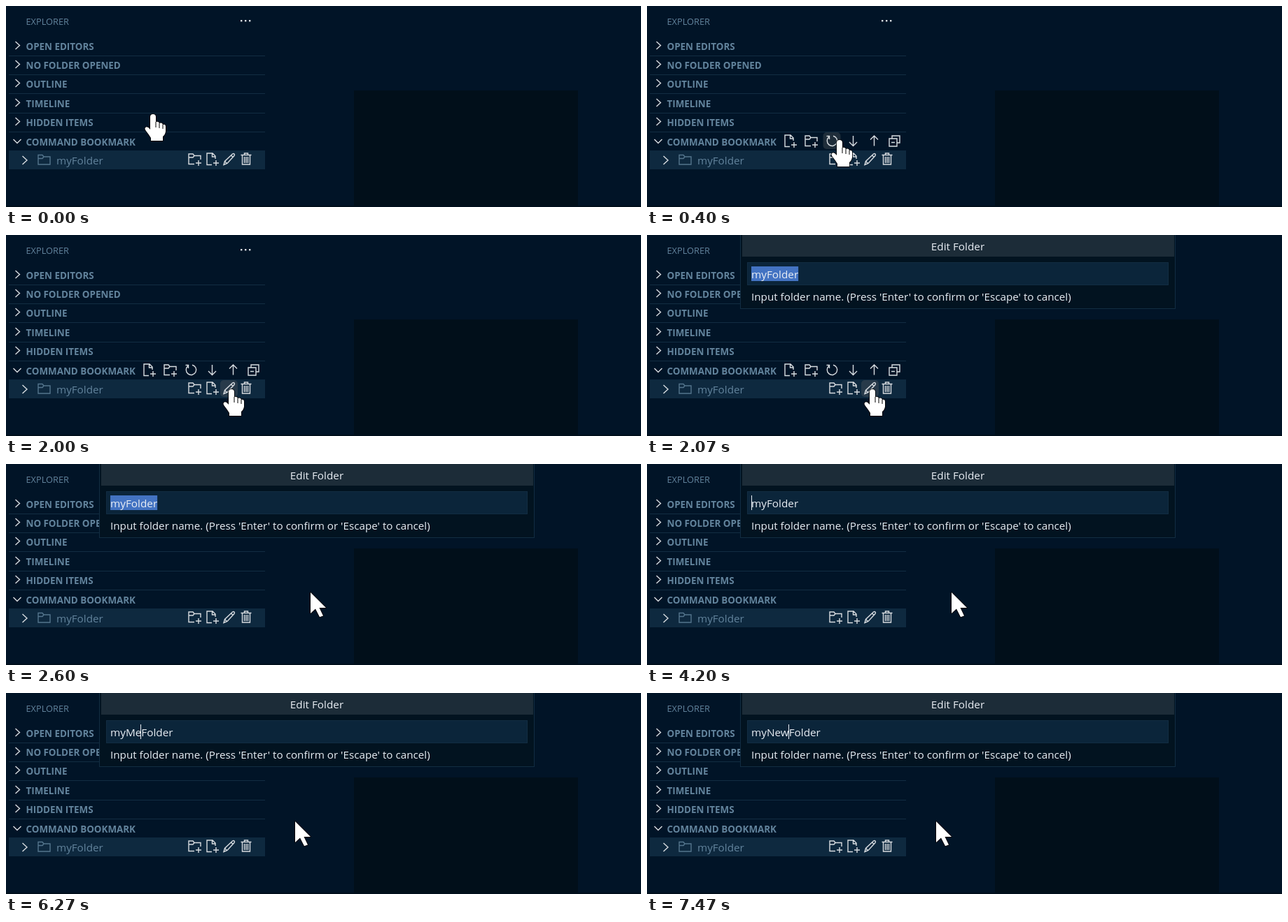
Write an HTML page with a canvas that moves like this. It is 907 px wide and 288 px high and loops after 8 s.

```html
<!DOCTYPE html>
<html lang="en">
<head>
<meta charset="utf-8">
<title>Edit Folder</title>
<style>
html, body { margin: 0; width: 100%; height: 100%; overflow: hidden; background: #011427; }
canvas { display: block; }
</style>
</head>
<body>
<canvas id="stage" width="907" height="288"></canvas>
<script>
const ctx = document.getElementById('stage').getContext('2d');
const LOOP = 8000, STEP = 200 / 3;
const FAMILY = '"Open Sans", "Noto Sans", sans-serif';
const BODY = '15.3px ' + FAMILY;
const HEAD = 'bold 13.4px ' + FAMILY;
const BACK = '#011427', LINE = '#122d42', MUTED = '#62839c', LIGHT = '#d8dce0', TEXT = '#e9eef4';

const sections = ['OPEN EDITORS', 'NO FOLDER OPENED', 'OUTLINE', 'TIMELINE', 'HIDDEN ITEMS', 'COMMAND BOOKMARK'];

const newFolder = 'M9 16.5H1V2h6l2 2.5h9V10M1 7h6l2-2.5M15 11v8M11 15h8';
const newFile = 'M8 17.5H1V1h8l4 4v4M8.5 1v5H13M14 11v8M10 15h8';
const folder = 'M1 14.5V1h6l2 2.5h9v11zM1 6h6l2-2.5';
const pencil = 'M1 17.5l1.5-5L13.5 2q1.5-1 2.5 0t0 2.5L6 15.5zM11.5 4l3 3M2.5 12.5l3 3';
const trash = 'M.5 3.5h15M5.5 3V1h5v2M2.5 4v13h11V4M5.5 6v9M8 6v9M10.5 6v9';

// Each icon: path, left, top, hover centre x
const rowIcons = [[newFolder, 260, 210, 269], [newFile, 286, 210, 294], [pencil, 310, 210, 318.5], [trash, 335, 210, 343]];
const barIcons = [
  [newFile, 196, 184, 205],
  [newFolder, 225, 184, 235],
  ['M4 2.6A7.2 7.2 0 1 0 10 1.2M.5 1.5h4v4.5', 256, 185, 264],
  ['M7.5 1v14M2 10l5.5 5.5L13 10', 287, 185, 294],
  ['M7.5 15.5V1M2 6.5L7.5 1L13 6.5', 317, 185, 324],
  ['M5 5V1h11v10h-4M1 5h11v11H1zM4 10.5h5', 345, 185, 353]
];

const hand = new Path2D('M-4 4Q-4 0 0 0T4 4V11Q8 10 9 13Q13 11.5 14 15Q18 14 18 18V25Q17 30 14 32V38H-3V34Q-6 29-10 24Q-13 20-10 18.5Q-7 17.5-4 22Z');
const fingers = new Path2D('M4 11v8M9 13v7M14 15v6');
const arrow = new Path2D('M0 1V31L7 24.5L13 36.3L18 34.5L12.5 23H22Z');

// Pointer tip: time, x, y
const moves = [[0, 210, 155], [667, 310, 212], [867, 314, 216], [1000, 322, 221],
  [2334, 322, 221], [2600, 435, 183], [4933, 435, 183], [5000, 413, 183], [LOOP, 413, 183]];

// Time, text before the caret, caret shown
const edits = [[4200, '', 1], [4530, 'm', 1], [4670, 'my', 1], [5200, 'my', 0],
  [5400, 'myM', 1], [5730, 'myMe', 1], [5870, 'myMew', 1], [6270, 'myMe', 1],
  [6400, 'myMe', 0], [6530, 'myM', 1], [6930, 'my', 1], [7070, 'myN', 1],
  [7330, 'myNe', 1], [7470, 'myNew', 1]];

function rect(x, y, w, h, color) {
  ctx.fillStyle = color;
  ctx.fillRect(x, y, w, h);
}

function frame(x, y, w, h, color) {
  ctx.strokeStyle = color;
  ctx.lineWidth = 1;
  ctx.strokeRect(x + .5, y + .5, w - 1, h - 1);
}

function text(str, x, y, font, color, align = 'left') {
  ctx.font = font;
  ctx.fillStyle = color;
  ctx.textAlign = align;
  ctx.fillText(str, x, y);
}

function icon(path, x, y, color = LIGHT) {
  ctx.save();
  ctx.translate(x, y);
  ctx.strokeStyle = color;
  ctx.lineWidth = 1.4;
  ctx.stroke(new Path2D(path));
  ctx.restore();
}

function actions(icons, cy, tip) {
  for (const [path, x, y, cx] of icons) {
    if (Math.abs(tip.x - cx) < 12.5 && Math.abs(tip.y - cy) < 13) {
      ctx.fillStyle = 'rgba(90,93,94,.35)';
      ctx.beginPath();
      ctx.roundRect(cx - 12.5, cy - 12, 25, 24, 5);
      ctx.fill();
    }
    icon(path, x, y);
  }
}

function tipAt(t) {
  const q = Math.floor((t + 5) / STEP) * STEP;
  let i = 0;
  while (i < moves.length - 2 && q >= moves[i + 1][0] - 1) i++;
  const [t0, x0, y0] = moves[i], [t1, x1, y1] = moves[i + 1];
  let p = Math.max(0, Math.min(1, (q - t0) / (t1 - t0)));
  if (i === 0) p = p * p * (3 - 2 * p);
  return { x: Math.round(x0 + (x1 - x0) * p), y: Math.round(y0 + (y1 - y0) * p) };
}

function sidebar(tip) {
  text('EXPLORER', 28.5, 27, '12.8px ' + FAMILY, MUTED);
  for (const x of [335, 341, 347]) rect(x, 20, 2.4, 2.4, LIGHT);
  sections.forEach((name, i) => {
    const base = Math.round(62.7 + i * 27.37);
    const open = i === sections.length - 1;
    text(name, 28.5, base, HEAD, MUTED);
    if (open) icon('M0 0l5.5 5.5L11 0', 10.5, 191);
    else {
      icon('M0 0l6 5.5L0 11', 13.5, base - 12);
      rect(4, base + 8, 366, 1, LINE);
    }
  });
  rect(4, 207, 366, 27, '#0e293f');
  icon('M0 0l6.5 6L0 12', 23.5, 215);
  icon(folder, 45, 212.5, '#54758d');
  text('myFolder', 72, 227, '15.2px ' + FAMILY, MUTED);
  actions(rowIcons, 220, tip);
  if (tip.x < 370 && tip.y > 181) actions(barIcons, 193, tip);
}

function dialog(t) {
  rect(133, 0, 622, 106, '#021320');
  rect(136, 0, 617, 31, '#1c2c38');
  frame(133, -1, 622, 107, LINE);
  text('Edit Folder', 444, 22, BODY, TEXT, 'center');
  rect(143, 39, 602, 33, '#0b253a');
  frame(143, 39, 602, 33, LINE);
  const edit = edits.filter(e => e[0] <= t).pop();
  const typed = edit ? edit[1] : '';
  ctx.font = BODY;
  if (!edit) rect(149, 45, ctx.measureText('myFolder').width, 21, '#4373c2');
  text(typed + 'myFolder'.slice(Math.min(typed.length, 2)), 149, 62, BODY, TEXT);
  if (edit && edit[2]) rect(Math.floor(148.5 + ctx.measureText(typed).width) + (typed ? 0 : 1), 45, 1, 21, TEXT);
  text("Input folder name. (Press 'Enter' to confirm or 'Escape' to cancel)", 149, 94, '15.22px ' + FAMILY, TEXT);
}

function tooltip() {
  rect(329, 237, 48, 32, BACK);
  frame(329, 237, 48, 32, MUTED);
  text('Edit', 339, 259, BODY, TEXT);
}

function pointer(tip) {
  const pointing = tip.x < 370;
  ctx.save();
  ctx.translate(tip.x, tip.y);
  ctx.lineJoin = 'round';
  ctx.strokeStyle = '#000';
  ctx.lineWidth = 1.5;
  ctx.stroke(pointing ? hand : arrow);
  ctx.fillStyle = '#fff';
  ctx.fill(pointing ? hand : arrow);
  if (pointing) {
    ctx.lineWidth = 1;
    ctx.stroke(fingers);
  }
  ctx.restore();
}

function draw(t) {
  const tip = tipAt(t);
  rect(0, 0, 907, 288, BACK);
  rect(497, 121, 320, 320, '#010f1a');
  rect(0, 286, 907, 2, '#010f1c');
  sidebar(tip);
  if (t >= 1600 && t < 2000) tooltip();
  if (t >= 2070) dialog(t);
  pointer(tip);
}

const start = performance.now();
function tick() {
  draw((performance.now() - start) % LOOP);
  requestAnimationFrame(tick);
}
tick();
</script>
</body>
</html>
```
